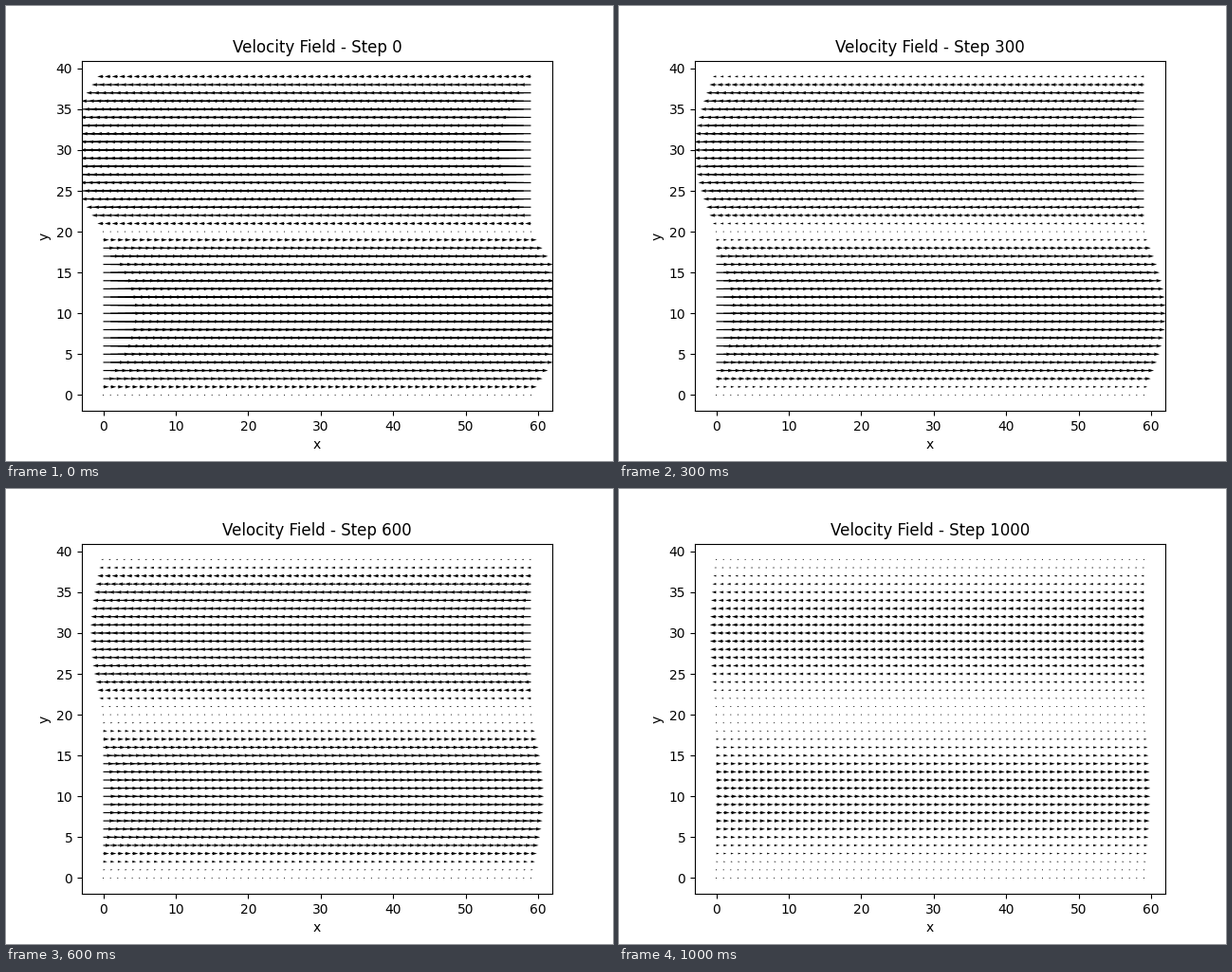
Write a matplotlib script that moves like this. It is 640 by 480 pixels and loops after 1.1 s.

```python
import numpy as np
import matplotlib.pyplot as plt
from matplotlib.animation import FuncAnimation

NX, NY = 60, 40
AMPLITUDE = 0.08
OMEGA = 1.4
VISCOSITY = (1 / OMEGA - 0.5) / 3
K = 2 * np.pi / NY
FRAMES, STRIDE, INTERVAL = 11, 100, 100

x, y = np.meshgrid(np.arange(NX), np.arange(NY))


def velocity(step):
    """Shear wave damped by viscosity."""
    return AMPLITUDE * np.exp(-VISCOSITY * K**2 * step) * np.sin(K * y)


fig, ax = plt.subplots(figsize=(6.4, 4.8), dpi=100)
still = np.zeros(x.shape)
arrows = ax.quiver(x, y, velocity(0), still, scale=1)
title = ax.set_title("Velocity Field - Step 0")
ax.set_xlabel("x")
ax.set_ylabel("y")


def update(i):
    step = i * STRIDE
    arrows.set_UVC(velocity(step), still)
    title.set_text(f"Velocity Field - Step {step}")
    return arrows, title


anim = FuncAnimation(fig, update, frames=FRAMES, interval=INTERVAL,
                     repeat=True, repeat_delay=0)
plt.show()
```
